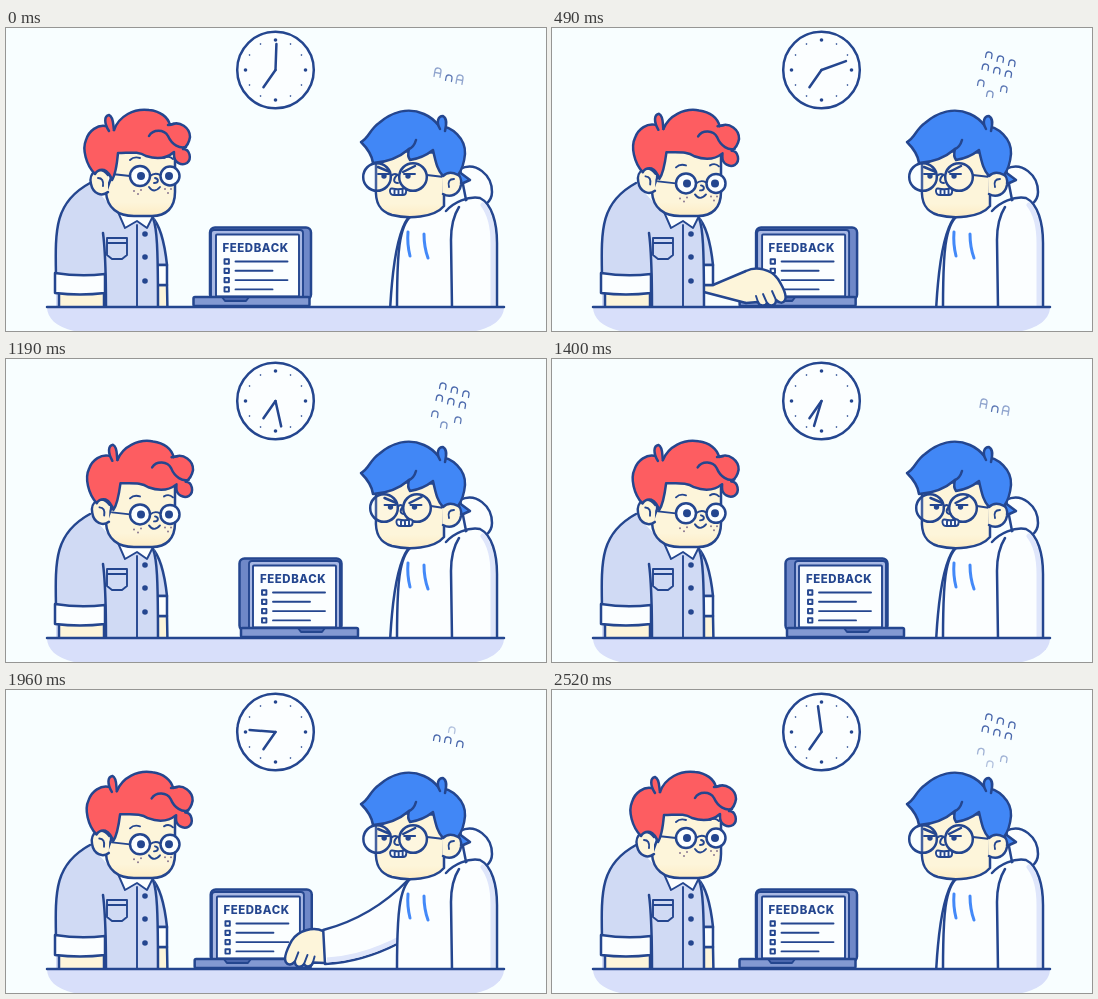
Recreate the animation shown at these times as an HTML page. Size 540 px wide and 303 px high, loop 2590 ms.

```html
<!DOCTYPE html>
<html lang="en">
<head>
<meta charset="utf-8">
<title>Feedback</title>
<style>
html, body { margin: 0; width: 100%; height: 100%; overflow: hidden; background: #f8feff; }
svg { display: block; width: 100vw; height: 100vh; }
.ink { stroke: #24468f; stroke-width: 2.5; stroke-linecap: round; stroke-linejoin: round; }
.thin { stroke-width: 1.9; }
.no { fill: none; }
.skin { fill: url(#skin); }
.flesh { fill: #fdf5da; }
.white { fill: #fbfeff; }
.shirt { fill: #d0daf4; }
.red { fill: #fd5d61; }
.blue { fill: #4187f6; }
.dot { fill: #24468f; }
.shade { fill: none; stroke: #dfe6fb; stroke-width: 5; }
.title { font: 800 11.4px Inter, sans-serif; letter-spacing: .6px; fill: #24468f; }
</style>
</head>
<body>
<svg viewBox="0 0 540 303" preserveAspectRatio="none">
  <defs>
    <linearGradient id="skin" x1="0" y1="0" x2="0" y2="1">
      <stop offset=".8" stop-color="#fdf5da"/><stop offset="1" stop-color="#fdecc4"/>
    </linearGradient>
    <g id="hand">
      <path class="ink flesh" d="M0-16C10-21 25-18 32-8C37 0 41 9 39 13C37 17 33 16 30 13C30 19 24 20 21 16C19 20 13 19 12 15L0 16"/>
      <path class="ink thin no" d="M30 13L26 4M21 16L17 7M12 15L10 9"/>
    </g>
  </defs>
  <rect width="540" height="303" fill="#f8feff"/>

  <g class="ink">
    <circle class="white" cx="269.5" cy="42" r="38.3"/>
    <g id="ticks" class="dot" stroke="none"></g>
    <path class="no" d="M269.5 42V21" transform="rotate(215 269.5 42)"/>
    <path id="minute" class="no" d="M269.5 42V16"/>
  </g>
  <g id="steam" class="no" stroke="#4a68ac" stroke-width="1.3" stroke-linecap="round"></g>

  <g>
    <rect id="lid" class="ink" y="199.5" height="72" rx="5" fill="#6f88c8"/>
    <rect id="face" class="ink thin" y="202" height="69" rx="3" fill="#a9b9e4"/>
    <rect id="screen" class="ink thin white" y="206.5" width="83" height="62" rx="1"/>
    <g id="page">
      <text class="title" x="0" y="223.800">FEEDBACK</text>
      <g id="list"></g>
    </g>
    <rect id="base" class="ink" y="269" height="9" rx="1.5" fill="#8399d2"/>
    <path id="notch" class="ink thin" fill="#4b67ae" d="M0 269H27L24 273H3Z"/>
  </g>

  <g>
    <path id="foreL" class="ink flesh"/>
    <use id="handL" href="#hand"/>
    <path id="sleeveL" class="ink shirt"/>
    <path id="cuffL" class="ink white"/>
  </g>
  <g>
    <use id="handR" href="#hand"/>
    <path id="sleeveR" class="ink white"/>
    <path id="shadeR" class="shade"/>
  </g>

  <g class="ink">
    <path class="shirt" stroke="none" d="M50 280V225C49 190 56 170 84 155L113 187H147C151 195 152 205 152 280Z"/>
    <path class="no" d="M50 248C49 200 49 174 84 155M147 190C151 200 152 220 152 280"/>
    <path class="no" d="M97 205C99 220 100 245 100 280"/>
    <path class="flesh" d="M53 264V280H98V264Z"/>
    <path class="white" d="M49 245Q74 249 99 246V265Q74 268 49 265Z"/>
    <path class="no thin" d="M131 197V280"/>
    <path class="no thin" d="M101 210H121V227L116 231H106L101 227ZM101 215H121"/>
    <g class="dot" stroke="none">
      <circle cx="139" cy="206" r="2.8"/><circle cx="139" cy="229" r="2.8"/><circle cx="139" cy="253" r="2.8"/>
    </g>
    <path class="white thin" d="M112 184L119 200L131 193L141 200L148 186Z"/>
  </g>

  <g class="ink">
    <path class="skin" d="M105 120V150L100 164C101 180 112 188 128 188H146C160 188 169 180 169 164V120Z"/>
    <g id="lookL" class="no">
      <path class="thin" d="M124 148L106 146M144 148Q149 144 154 147M124 132Q128 128 134 130M158 130Q163 127 167 131"/>
      <circle class="white" cx="134" cy="148" r="10"/><circle class="white" cx="164" cy="148" r="9.500"/>
      <circle class="dot" cx="135" cy="148" r="4" stroke="none"/><circle class="dot" cx="163" cy="148" r="4" stroke="none"/>
      <path class="thin" d="M149 150C153 151 153 155 148 155M143 159Q148 166 154 159"/>
      <g fill="#8a7790" stroke="none">
        <circle cx="128" cy="163" r="1"/><circle cx="132" cy="166" r="1"/><circle cx="135" cy="162" r="1"/>
        <circle cx="159" cy="161" r="1"/><circle cx="162" cy="165" r="1"/><circle cx="165" cy="161" r="1"/>
      </g>
    </g>
    <g id="hairL">
      <path class="flesh" d="M102 147C94 137 82 144 85 156C87 166 96 169 102 164"/>
      <path class="no thin" d="M92 150Q98 150 97 158"/>
      <path class="red" d="M89 146C80 137 76 121 80 112C83 102 92 97 99 98C103 98 106 100 108 102C113 88 128 80 143 82C154 83 162 89 164 97C174 92 184 100 184 109C183 116 180 119 177 121C184 121 186 131 181 135C176 138 168 135 168 127V124C160 131 149 131 140 128C132 123 124 125 112 125C111 136 110 146 106 152Q103 144 98 142Q92 141 89 146Z"/>
      <path class="no" d="M143 108C147 101 158 101 162 108C166 117 174 121 180 119M162 97L168 96"/>
      <path class="red" d="M103 103C98 95 98 88 103 87C108 89 107 98 108 102"/>
    </g>
  </g>

  <g class="ink">
    <path class="white" d="M454 141C470 133 486 147 486 164C486 174 478 180 462 182Z"/>
    <path class="white" stroke="none" d="M405 188C393 198 391 225 391 280H491V215C491 195 486 176 474 170L440 178Z"/>
    <path class="shade" d="M487 279V215C487 200 484 186 477 177"/>
    <path class="no" d="M405 188C393 198 391 225 391 280M491 280V215C491 195 486 176 474 170C462 168 448 174 440 183"/>
    <path class="no" d="M453 179C446 190 445 205 445 212L446 280"/>
    <path class="no" stroke="#4389f8" stroke-width="3" d="M402 204Q401 216 404 228M418 206Q418 219 422 230"/>
  </g>

  <g class="ink">
    <path class="skin" d="M370 122V160C369 174 373 183 386 187C402 191 428 190 438 178V125Z"/>
    <g class="no">
      <path id="stem" class="thin"/>
      <circle id="lensA" cy="149" r="13.800" fill="#fff" fill-opacity=".15"/>
      <circle id="lensB" cy="149" r="13.800" fill="#fff" fill-opacity=".15"/>
      <g id="mug">
        <path d="M372 139L384 144M397 144L409 138"/>
        <path class="thin" d="M372 146H383M398 146H409M391 147C387 151 387 155 392 155"/>
        <circle class="dot" cx="378" cy="148" r="2.700" stroke="none"/><circle class="dot" cx="402" cy="148" r="2.700" stroke="none"/>
        <path class="white thin" d="M386 160.500Q392 162 398 160.500C401 160 401 167 397 167H388C383 167 383 160 386 160.500ZM388.500 161.500V167M392.500 161.500V167M396.500 161.500V167"/>
      </g>
    </g>
    <path class="blue" d="M452 143L464 152L455 156Z"/>
    <path class="flesh" d="M436 147C444 138 457 145 455 157C453 167 444 170 437 166"/>
    <path class="no thin" d="M448 151Q441 151 443 159"/>
    <path class="blue" d="M367 135C366 126 360 119 355 114C363 110 364 101 373 95C386 84 402 79 418 86C425 89 430 94 433 98C446 98 460 111 459 126C458 137 455 143 452 147Q443 142 437 148C432 143 430 136 427 122Q417 130 404 132Q401 128 403 121Q388 134 367 135Z"/>
    <path class="no" d="M403 121Q408 119 410 112"/>
    <path class="blue" d="M434 101C430 94 432 88 437 88C442 91 440 98 439 103"/>
  </g>

  <path fill="#d8dffa" d="M41 279H498C498 290 488 299 470 303H68C50 299 41 290 41 279Z"/>
  <path class="ink" d="M41 279H498"/>
</svg>
<script>
const LOOP = 2590, STEP = 70, NOD = 840;
const $ = id => document.getElementById(id);
const set = (id, attrs) => { for (const k in attrs) $(id).setAttribute(k, attrs[k]); };
const mix = (a, b, u) => a + (b - a) * u;
const ease = (t, a, b) => {
  const u = Math.min(1, Math.max(0, (t - a) / (b - a)));
  return u * u * (3 - 2 * u);
};
const rad = d => d * Math.PI / 180;

$('ticks').innerHTML = Array.from({ length: 12 }, (_, i) =>
  `<circle cx="269.5" cy="12" r="${i % 3 ? .8 : 1.8}" transform="rotate(${i * 30} 269.5 42)"/>`).join('');
$('list').innerHTML = [52, 37, 52, 37].map((w, i) => {
  const y = 233.5 + i * 9.3;
  return `<rect class="ink thin no" x="2" y="${y - 2.2}" width="4.4" height="4.4"/>` +
    `<path class="ink thin" d="M13 ${y}h${w}"/>`;
}).join('');

// Each pose: time, then values eased towards the next pose
function pose(keys, t) {
  let i = keys.length - 1;
  while (i && t < keys[i][0]) i--;
  const a = keys[i], b = keys[i + 1] || a;
  const u = a === b ? 0 : ease(t, a[0], b[0]);
  return a.slice(1).map((v, j) => mix(v, b[j + 1], u));
}

// wrist x, y, angle, cuff x, y, angle
const restL = [146, 300, 80, 143, 247, 90];
const pushL = [232, 258, 4, 170, 234, 30];
const keysL = [[0, ...restL], [210, ...restL], [490, 194, 259, 0, 143, 247, 90],
  [800, ...pushL], [860, ...pushL], [1150, ...restL]];
// wrist x, y, angle, sleeve bend x, y, armpit y
const restR = [400, 305, 80, 386, 212, 276];
const pullR = [318, 257, 3, 366, 227, 248];
const keysR = [[0, ...restR], [1400, ...restR], [1680, 350, 258, 0, 388, 265, 276],
  [1970, ...pullR], [2010, ...pullR], [2270, ...restR]];

// Both ends of a bar across a limb
function ends(x, y, angle, half, side) {
  const s = Math.sin(rad(angle)) * half * side, c = Math.cos(rad(angle)) * half;
  return [[x + s, y - c], [x - s, y + c]];
}

function drawArmL(t) {
  const [x, y, a, cx, cy, ca] = pose(keysL, t);
  const [top, low] = ends(x, y, a, 16, 1);
  const dx = Math.cos(rad(ca)) * 10, dy = Math.sin(rad(ca)) * 10;
  const [bt, bb] = ends(cx - dx, cy - dy, ca, 18, 1);
  const [ft, fb] = ends(cx + dx, cy + dy, ca, 18, 1);
  set('foreL', { d: `M${low}L${fb}L${ft}L${top}` });
  set('handL', { transform: `translate(${x} ${y}) rotate(${a})` });
  set('sleeveL', { d: `M146 189Q${mix(153, bt[0], .5)} 200 ${bt}L${bb}L120 235Z` });
  set('cuffL', { d: `M${bt}L${ft}L${fb}L${bb}Z` });
}

function drawArmR(t) {
  const [x, y, a, bx, by, pit] = pose(keysR, t);
  const [top, low] = ends(x, y, a, 17, -1);
  const [lx, ly] = low, mid = (lx + 402) / 2;
  set('handR', { transform: `translate(${x} ${y}) scale(-1 1) rotate(${a})` });
  set('sleeveR', { d: `M402 190Q${bx} ${by} ${top}L${low}Q${mid} ${ly - 2} 402 ${pit}Z` });
  set('shadeR', { d: `M${lx + 2} ${ly - 4}Q${mid} ${ly - 6} 402 ${pit - 4}` });
}

function drawLaptop(p) {
  set('lid', { x: mix(204, 233.5, p), width: mix(101, 102, p) });
  set('face', { x: mix(205, 243, p), width: mix(92, 91, p) });
  set('screen', { x: mix(210, 247, p) });
  set('page', { transform: `translate(${mix(216.5, 254, p)} 0)` });
  set('base', { x: mix(187.5, 235, p), width: mix(116, 117, p) });
  set('notch', { transform: `translate(${mix(216, 292, p)} 0)` });
}

function drawSteam(frame) {
  const k = frame % 5, marks = [];
  const add = (x, y, o = 1, tall = 0) => marks.push(
    `<path opacity="${o}" transform="translate(${x} ${y}) rotate(10)" d="M-3 ${3 + tall}V0C-3-4 3-4 3 0V${3 + tall}${tall ? 'M-3 2H3' : ''}"/>`);
  if (k === 0) {
    add(432, 43, .6, 3); add(443, 50, .9); add(454, 50, .6, 3);
  } else if (k < 3) {
    for (let i = 0; i < 3; i++) {
      add(437 + i * 11.5, 27 + i * 4);
      add(433.5 + i * 11.5, 39 + i * 3.5);
    }
    const drop = k === 1 ? 8 : 0, o = k === 1 ? .5 : .9;
    add(429, 55 + drop * .8, o); add(452, 61 + drop, o); add(438, 66 + drop, o * .8);
  } else {
    add(446, 40, .4); add(431, 48); add(442, 50); add(454, 54);
  }
  $('steam').innerHTML = marks.join('');
}

function drawFaces(t, p) {
  const nod = ease(Math.sin(Math.PI * t / NOD) ** 2, 0, 1);
  set('hairL', { transform: `rotate(${2.3 * nod} 135 187)` });
  set('lookL', { transform: `translate(0 ${7.5 * nod})` });
  const a = mix(371, 378, p), b = mix(407, 411, p);
  set('lensA', { cx: a });
  set('lensB', { cx: b });
  set('stem', { d: `M${a + 13.8} 148Q${(a + b) / 2} 144 ${b - 13.8} 148M${b + 13.8} 147L438 149` });
  set('mug', { transform: `translate(${6.5 * p} 0)` });
}

function draw(t) {
  const p = ease(t, 480, 800) - ease(t, 1670, 1990);
  set('minute', { transform: `rotate(${360 * t / LOOP + 2} 269.5 42)` });
  drawFaces(t, p);
  drawLaptop(p);
  drawArmL(t);
  drawArmR(t);
  drawSteam(Math.round(t / STEP));
}

const start = performance.now();
function tick() {
  const t = (performance.now() - start) % LOOP;
  draw(Math.floor(t / STEP) * STEP);
  requestAnimationFrame(tick);
}
draw(0);
requestAnimationFrame(tick);
</script>
</body>
</html>
```
